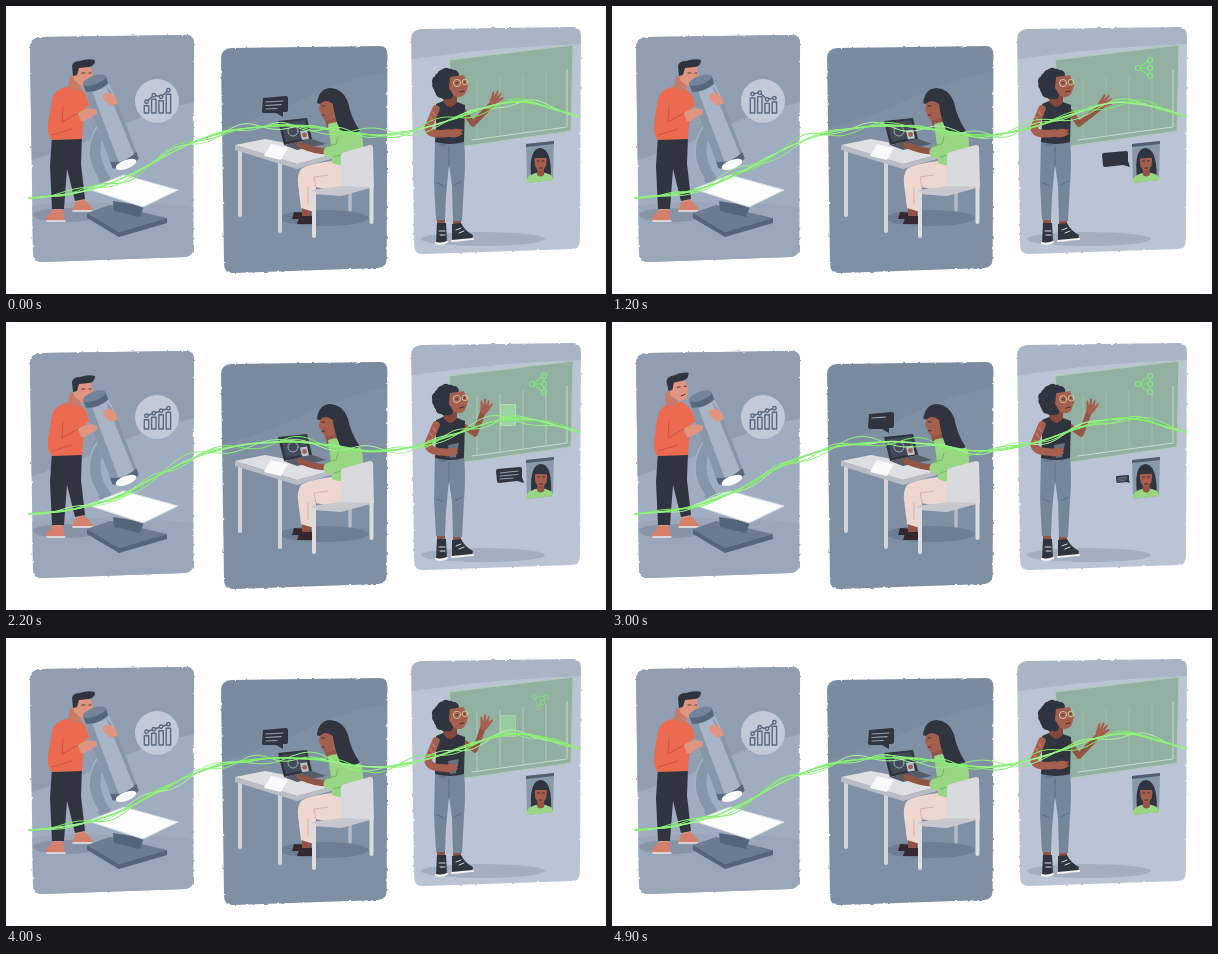
An HTML page that plays this animation: 600 by 288 pixels, repeating every 5 s.

```html
<!DOCTYPE html>
<html lang="en">
<head>
<meta charset="utf-8">
<title>Three workplaces</title>
<style>
html, body { margin: 0; width: 100%; height: 100%; overflow: hidden; background: #fefefe; }
svg { display: block; width: 100vw; height: 100vh; }
.line { fill: none; stroke-linecap: round; stroke-linejoin: round; }
.thin { stroke-width: .9; }
.ink { fill: #2f343e; }
.fair { fill: #e09581; }
.tan { fill: #a55f4e; }
.brown { fill: #915445; }
.note { stroke: #9aa1ab; stroke-width: 1.2; }
</style>
</head>
<body>
<svg viewBox="0 0 600 288">
<defs>
  <filter id="rough" x="-5%" y="-5%" width="110%" height="110%" color-interpolation-filters="sRGB">
    <feTurbulence type="fractalNoise" baseFrequency=".2" numOctaves="2" seed="4"/>
    <feDisplacementMap in="SourceGraphic" scale="2.4" xChannelSelector="R" yChannelSelector="G"/>
  </filter>
  <clipPath id="panel"><path d="M10 2L157 0Q165 0 165 9L164 213Q164 221 156 222L13 227Q3 228 3 218L0 12Q0 3 10 2Z"/></clipPath>
  <clipPath id="tile"><path d="M520 141L548 138L547 174L521 177Z"/></clipPath>
  <path id="wash" d="M-9-60H180V64Q120 76 88 92Q45 114-9 128Z"/>
</defs>

<!-- panels -->
<g filter="url(#rough)">
  <g transform="translate(24 29) scale(.995 1)" clip-path="url(#panel)">
    <path fill="#a0acbf" d="M-9-9H180V240H-9Z"/><use href="#wash" fill="#919eb1"/>
    <path fill="#9aa7ba" d="M-9 172Q76 161 180 174V240H-9Z"/>
  </g>
  <g transform="translate(215 40) scale(1.010 1)" clip-path="url(#panel)">
    <path fill="#8090a4" d="M-9-9H180V240H-9Z"/><use href="#wash" y="-42" fill="#7b8b9f"/>
  </g>
  <g transform="translate(405 21) scale(1.030 1)" clip-path="url(#panel)">
    <path fill="#bac4d4" d="M-9-9H180V240H-9Z"/>
    <path fill="#a9b5c5" d="M-9-9H180V17Q90 18-9 34Z"/>
  </g>
</g>

<!-- microscope scene -->
<ellipse cx="60" cy="209" rx="33" ry="7" fill="#8794a8"/>
<circle cx="151" cy="95" r="22" fill="#c1cad6"/>
<g id="chart" class="line" stroke="#596980" stroke-width="1.4"></g>
<path class="fair" d="M48 194H56V210H48ZM70 188H78V199H71Z"/>
<path fill="#d67f6b" d="M46 204H57L59 214L41 215Q38 212 44 208ZM69 197L78 194Q85 199 87 204L66 205Z"/>
<path class="line" stroke="#f0ece9" stroke-width="1.4" d="M41 215H59M67 205H86"/>
<path class="ink" d="M46 130H76L75 158L79 193L69 195L61 163L58 203H46L44 160Z"/>
<path fill="#ec6a50" d="M60 81Q49 83 46 93L42 118Q41 129 46 134L76 133L78 109L82 92Q75 82 70 80Z"/>
<path class="line" stroke="#ec6a50" stroke-width="9" d="M73 90Q84 100 92 96"/>
<g id="manHead">
  <path fill="#c97967" d="M64 70L76 74L74 84Q68 86 62 81Z"/>
  <path class="fair" d="M68 59L84 60L87 70L84 79Q80 82 75 80L68 74Z"/>
  <path class="ink" d="M67 70L66 60Q67 55 74 55Q82 52 89 54Q89 60 83 61L73 62L71 69Z"/>
  <path class="line thin" stroke="#3b2b2e" d="M76 67H79M83 67H85M79 76L83 75"/>
</g>
<path class="line" stroke="#8595aa" stroke-width="12" d="M98 116Q78 145 99 174"/>
<path class="line" stroke="#a4b1c3" stroke-width="2" d="M91 120Q74 147 92 173"/>
<path fill="#6c7b90" d="M81 207L104 199L161 212L113 226Z"/>
<path fill="#54647a" d="M81 207L113 226L161 212V217L113 231L81 212ZM107 195L138 200L134 211L108 205Z"/>
<path fill="#fdfdfe" stroke="#d6dde5" d="M82 183L118 169L172 184L137 201Z"/>
<g transform="translate(89 76) rotate(-20.600)">
  <path fill="#a9b5c7" d="M-12 4L-14 24V84Q0 94 14 84V24L12 4Z"/>
  <path fill="#8696ab" d="M-12 4L-14 24V84L-6 88V8ZM9 6L11 86L14 84V24Z"/>
  <path fill="#56667c" d="M-12-2V6Q0 11 12 6V-2ZM-14 80Q0 87 14 80V87Q0 96-14 87Z"/>
  <ellipse cy="-2" rx="12" ry="4.500" fill="#73849a"/>
  <ellipse cy="88" rx="11" ry="4.500" fill="#f8fafb"/>
</g>
<path class="line" stroke="#ec6a50" stroke-width="11" d="M52 94L49 120Q52 126 72 113"/>
<path class="line thin" stroke="#c9523f" d="M57 100L56 116L72 107M46 129L66 123"/>
<path class="fair" d="M72 107Q81 100 91 104L91 108L85 111Q79 116 75 115ZM97 89Q102 85 107 88Q112 92 111 98L105 100L98 94Z"/>

<!-- desk scene -->
<ellipse cx="318" cy="212" rx="45" ry="8" fill="#6d7d93"/>
<path class="line" stroke="#b6bac2" stroke-width="3.500" d="M344 187V204M318 158V181"/>
<path class="line" stroke="#d3d4d8" stroke-width="4" d="M234 145V209M274 157V225"/>
<path fill="#34272d" d="M288 206L304 207L306 213H286ZM294 209L308 210L307 218H291Z"/>
<path class="brown" d="M296 198L307 201L304 210H296Z"/>
<path fill="#eed7d1" d="M352 156L326 155Q302 158 295 163Q291 169 292 178L295 202L308 206L310 181L336 187Q356 184 355 166Z"/>
<path class="line thin" stroke="#cdaead" d="M310 181L308 171L322 169M302 181V198"/>
<path fill="#dedfe2" d="M229 139L259 133L332 147L291 158Z"/>
<path fill="#b9bdc5" d="M229 139L291 158L332 147V151L291 163L229 144Z"/>
<path fill="#fafafa" d="M258 150L265 138L282 142L275 154Z"/>
<path class="ink" d="M272 115L301 112L306 133L278 139Z"/>
<path fill="#424a58" d="M275 117L299 114L303 131L280 136Z"/>
<circle cx="287" cy="125" r="5" class="line thin" stroke="#a9b6bd"/>
<g id="chat"><path fill="#b9c2cb" d="M294 125L301 124L303 133L296 134Z"/><circle cx="298.500" cy="129" r="2.400" class="tan"/></g>
<path fill="#555c69" d="M278 139L306 133L320 138L291 144Z"/>
<path class="brown" d="M318 109L331 112L334 121L321 122Z"/>
<path fill="#98d683" d="M322 118Q337 113 350 121Q358 126 357 143L354 158Q339 163 326 157L325 140Z"/>
<path class="line" stroke="#915445" stroke-width="6" d="M326 145Q313 147 294 139"/>
<path class="line" stroke="#98d683" stroke-width="11" d="M338 125L336 143L323 146"/>
<path class="line thin" stroke="#70b45d" d="M332 131L330 138L321 140M328 151L342 147"/>
<g id="deskHead">
  <path class="tan" d="M315 93H327L329 111Q322 117 317 112L315 107L313 104Z"/>
  <path class="ink" d="M311 97Q313 82 325 82Q337 83 342 96Q345 112 354 125Q344 130 334 124Q328 110 327 98Q319 92 314 98Z"/>
  <path class="line thin" stroke="#3d2729" d="M316 100H319M316 109H319"/>
</g>
<path fill="#d9dadd" d="M335 149Q335 147 338 146L364 139Q367 139 367 142L368 181L335 188Z"/>
<path fill="#c6c8ce" d="M306 184L335 180L368 181L335 190L306 188Z"/>
<path class="line" stroke="#dcdde0" stroke-width="4" d="M308 187V230M365.500 180V216"/>
<g id="deskBubble">
  <path class="ink" d="M257 92L280 90Q282 90 282 92V104Q282 106 280 106H277V111L270 107H258Q256 107 256 105Z"/>
  <path class="line note" pathLength="1" d="M260 96L277 95"/>
  <path class="line note" pathLength="1" d="M260 99.500L275 98.700"/>
  <path class="line note" pathLength="1" d="M260 103L271 102.500"/>
</g>

<!-- board scene -->
<ellipse cx="477" cy="233" rx="62" ry="7" fill="#a3afc1"/>
<path fill="#7fa78a" fill-opacity=".68" stroke="#b1cbb8" d="M443 54L567 39L565 125L453 141Z"/>
<g class="line" stroke="#c6ddca">
  <path d="M466 134L561 121V64"/>
  <g id="grid" class="thin"></g>
</g>
<rect id="card" fill="#a0eb9c" stroke="#d0f7c9" stroke-width=".8"/>
<g id="nodes" class="line" stroke="#7dec78" stroke-width="1.100">
  <path d="M-5 0H3M-4-2L3-7M-4 2L3 7M5-5V-3M5 3V5"/>
  <circle cx="-7" r="2.500"/><circle cx="5" cy="-8" r="2.500"/><circle cx="5" r="2.500"/><circle cx="5" cy="8" r="2.500"/>
</g>
<path fill="#8999ac" d="M520 138L548 135L547 174L521 177Z"/>
<path fill="#525e6e" d="M520 138L548 135V138L520 141Z"/>
<g clip-path="url(#tile)"><g id="caller">
  <path class="ink" d="M525 170Q523 143 534 142Q545 142 545 169Z"/>
  <path fill="#98d683" d="M516 180L523 170Q534 163 545 169L552 179Z"/>
  <path class="brown" d="M531 160H538V169Q534 172 531 169Z"/>
  <path class="tan" d="M528 151H541L540 160Q534 169 529 160Z"/>
  <path class="ink" d="M527 155Q527 145 534 145Q542 145 542 155L540 152H529Z"/>
  <path class="line thin" stroke="#38252a" d="M531 155H533M536 155H538M533 162H536"/>
</g></g>
<g id="callBubble">
  <path class="ink" d="M491 147L514 145Q516 145 516 147V155L518 161L511 159L493 161Q491 161 491 159L490 149Z"/>
  <path class="line note" pathLength="1" d="M494 151L512 149"/>
  <path class="line note" pathLength="1" d="M494 154L512 152.500"/>
  <path class="line note" pathLength="1" d="M494 157L507 156"/>
</g>
<path id="farArm" class="line" stroke="#915445" stroke-width="5.500"/>
<path class="brown" d="M431 211H439V222H431ZM447 211H455V222H447Z"/>
<path class="ink" d="M431 217H440L441 236L430 237ZM446 218L455 217Q459 225 467 229L466 234L446 235Z"/>
<path class="line" stroke="#f4f3f1" stroke-width="2" d="M430 237Q435 239 441 236M446 235L467 233"/>
<path class="line thin" stroke="#eef0f1" d="M433 225H439M434 229H439M450 224L455 222M453 227L458 225"/>
<path fill="#75869b" d="M429 134H458Q460 155 458 178L456 215H447L446 180L443 158L440 190L439 214H430L428 177Z"/>
<path class="line thin" stroke="#58697f" d="M443 141V161M431 177L438 180M449 179L456 175M433 139H440"/>
<path fill="#84493c" d="M438 86L451 89V99L445 104L437 98Z"/>
<path class="ink" d="M430 98L437 95Q444 106 451 96L459 99L458 136Q444 140 429 136L430 117Z"/>
<g id="boardHead">
  <g id="curls" class="ink"></g>
  <path class="tan" d="M444 71L458 69L462 80L459 88Q455 93 448 90L443 82Z"/>
  <g class="line thin" stroke="#d1cea1"><circle cx="451" cy="77" r="3.600"/><circle cx="459" cy="76" r="2.800"/></g>
  <path class="line thin" stroke="#38242a" d="M450 77H452M458 76H459M454 86L458 85"/>
</g>
<path id="nearArm" class="line" stroke="#a55f4e" stroke-width="7.500"/>
<path class="line" stroke="#c67764" stroke-width="1.400" d="M427 106L429 109M424 111L427 115M422 118L426 120"/>
<path id="cup" fill="#687484" d="M442 123L453 121L450 135L444 136Z"/>
<path id="nearHand" class="tan" d="M-5-3Q1-5 6-3L10-2L7 0L9 2L4 4Q-3 5-5 3Z"/>
<path id="farHand" class="tan" d="M-4 4V-2Q-5-8-3-9L-1-3L0-11L2-10V-3L5-10L6-8L5-2L9-6L10-4L6 2Q3 7-1 7Z"/>

<g id="waves" class="line"></g>
</svg>

<script>
const LOOP = 5000, STEP = 100, TAU = Math.PI * 2;
const $ = id => document.getElementById(id);
const set = (el, attrs) => { for (const k in attrs) el.setAttribute(k, attrs[k]); };
const add = (parent, tag, attrs = {}) => {
  const el = document.createElementNS("http://www.w3.org/2000/svg", tag);
  set(el, attrs);
  return parent.appendChild(el);
};
const clamp = u => Math.max(0, Math.min(1, u));
const ease = u => (u = clamp(u), u * u * (3 - 2 * u));
const range = n => Array.from({ length: n }, (_, i) => i);

// Eases 0 to 1 from `on`, and back to 0 from `off`.
const pulse = (t, on, off, rise = 300, fall = rise) => ease((t - on) / rise) - ease((t - off) / fall);

// The shared course of all strands: one long climb, a dip and a crest.
const bump = (x, mid, width) => Math.exp(-(((x - mid) / width) ** 2) / 2);
const spine = x => 194 - 77 / (1 + Math.exp((149 - x) / 35)) + 12 * bump(x, 373, 42) - 21 * bump(x, 511, 42);

const XS = range(139).map(i => Math.min(574, 23 + i * 4));
const strands = range(5).map(i => ({
  amp: i && 3 + i, len: 48 + 13 * i, turns: (i % 2 ? 1 : -1) * (1 + i % 3), phase: i * 1.7,
  el: add($("waves"), "path", { stroke: `hsl(110 80% ${66 + i % 3 * 6}%)`, "stroke-width": i ? 1 : 1.6 })
}));

const bars = range(4).map(i => {
  const x = 140.5 + i * 7.3;
  return { x, dot: add($("chart"), "circle", { cx: x, r: 1.7, fill: "#c1cad6" }),
    box: add($("chart"), "rect", { x: x - 2.2, width: 4.4 }) };
});
const chartLine = add($("chart"), "path");
$("chart").prepend(chartLine);

for (const i of range(4)) add($("grid"), "path", { d: `M${471 + i * 23} ${75 - i * 3}V${132 - i * 3}` });

// Curls follow an arc over the crown and down the back of the head.
add($("curls"), "circle", { cx: 442, cy: 77, r: 12 });
for (const i of range(11)) {
  const a = 1.5 + i * .38;
  add($("curls"), "circle", { cx: 442 + 11 * Math.cos(a), cy: 78 + 11 * Math.sin(a), r: 4.4 + i % 3 * .5 });
}

function bubble(id, px, py, size, text) {
  const g = $(id);
  set(g, { transform: `translate(${px} ${py}) scale(${size}) translate(${-px} ${-py})`,
    visibility: size > .02 ? "visible" : "hidden" });
  g.querySelectorAll(".note").forEach((el, i) => {
    const shown = clamp(text * 3 - i);
    set(el, { "stroke-dasharray": `${shown} 2`, opacity: shown > 0 ? 1 : 0 });
  });
}

function drawChart(t) {
  const slope = 5.2 * pulse(t, 800, 1700, 400) - 2.5;
  const zigzag = 2 * (1 - pulse(t, 1300, 4300, 600));
  const ys = bars.map((_, i) => 90 + slope * (i - 1.5) + zigzag * (i % 2 ? -1 : 1));
  set(chartLine, { d: "M" + bars.map(({ x }, i) => `${x} ${ys[i]}`).join("L") });
  bars.forEach(({ dot, box }, i) => {
    set(dot, { cy: ys[i] });
    set(box, { y: ys[i] + 4, height: 103 - ys[i] });
  });
}

function drawPeople(t, turn) {
  const up = pulse(t, 2500, 3300, 300, 400);
  set($("manHead"), { transform: `translate(${-9 * up} ${-up}) rotate(${-7 * up} 69 81)` });
  const sway = (id, x, y, beats, size) =>
    set($(id), { transform: `rotate(${Math.sin(turn * beats) * size} ${x} ${y})` });
  sway("deskHead", 329, 117, 2, .8);
  sway("boardHead", 445, 93, 2, .7);
  sway("caller", 534, 177, 3, 1.5);
  set($("chat"), { transform: `translate(0 ${Math.sin(turn * 3) * .5})` });

  const touch = pulse(t, 200, 600), low = pulse(t, 700, 1800, 400), raised = pulse(t, 1800, 4200, 400);
  const hx = 488 - 6 * touch + 3 * low - 10 * raised, hy = 93 - 2 * touch + 3 * low - 7 * raised;
  set($("farArm"), { d: `M456 103L${467 + 2 * raised} ${118 - 6 * raised}L${hx - 1} ${hy + 4}` });
  set($("farHand"), { transform: `translate(${hx} ${hy}) rotate(${20 + 18 * (low - raised)}) scale(.88)` });
  const nx = 448 - 5 * raised, ny = 127 + 3 * raised;
  set($("nearArm"), { d: `M430 103L422 122Q423 130 ${nx - 5} ${ny}` });
  set($("nearHand"), { transform: `translate(${nx} ${ny}) rotate(-8)` });
  set($("cup"), { opacity: raised });
}

function drawBoard(t) {
  const first = pulse(t, 0, 600), second = pulse(t, 1800, 2500), third = pulse(t, 3600, 4000, 400);
  const x = t < 1500 ? 491 : 502, y = t < 1500 ? 85 : t < 3200 ? 93 : 88;
  const shown = first + second + third, w = 9 + 6 * shown, h = 14 + 7 * shown;
  set($("card"), { x: x - w / 2, y: y - h / 2, width: w, height: h, opacity: .65 * shown - .2 * third });
  set($("grid"), { opacity: .3 + .4 * shown });
  const nodes = pulse(t, 200, 3700, 500, 700);
  set($("nodes"), { transform: `translate(533 62) rotate(${(1 - nodes) * (t < 2000 ? -90 : 90)}) scale(${.6 + .4 * nodes})`,
    opacity: nodes });
}

function drawWaves(turn) {
  for (const { amp, len, turns, phase, el } of strands) {
    const points = XS.map(x => {
      const ends = Math.min(1, (x - 15) / 90, (582 - x) / 65);
      const swell = .4 + .6 * Math.sin(x / 50 + phase - turn);
      const y = spine(x) + amp * ends * swell * Math.sin(x / len * TAU - turns * turn + phase);
      return `${x} ${y.toFixed(2)}`;
    });
    set(el, { d: "M" + points.join("L") });
  }
}

function draw(t) {
  const turn = t / LOOP * TAU;
  drawChart(t);
  drawPeople(t, turn);
  drawBoard(t);
  drawWaves(turn);
  bubble("deskBubble", 276, 111, 1 - pulse(t, 700, 2600), 1 - pulse(t, 1000, 2800, 300, 600));
  bubble("callBubble", 518, 161, pulse(t, 900, 2700, 300, 600), pulse(t, 1400, 3300, 600));
}

const start = performance.now();
function frame() {
  const t = Math.max(0, performance.now() - start) % LOOP;
  draw(Math.floor(t / STEP) * STEP);
  requestAnimationFrame(frame);
}
frame();
</script>
</body>
</html>
```
